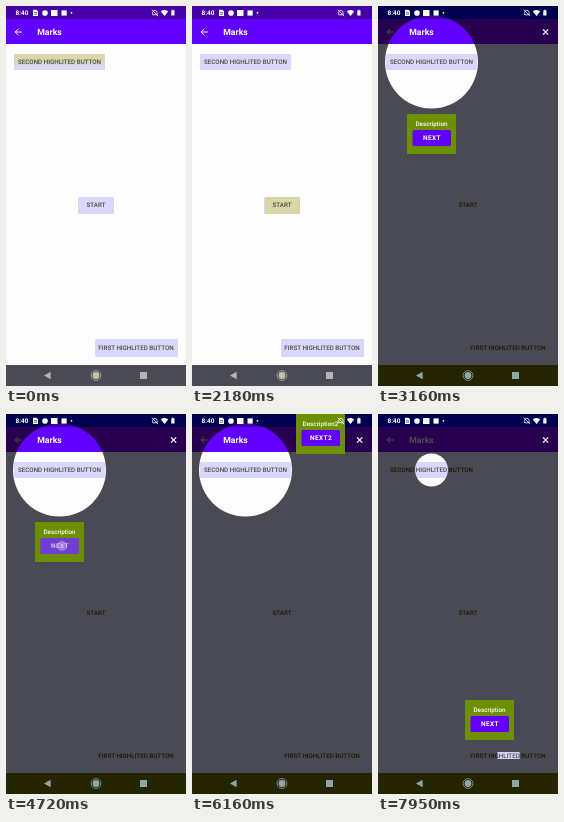
An HTML page for the animation above (8000 ms loop, 180 px wide and 380 px high).

```html
<!DOCTYPE html>
<html lang="en">
<head>
<meta charset="utf-8">
<title>Marks</title>
<style>
html, body { margin: 0; width: 100%; height: 100%; overflow: hidden; background: #fdfdfd; }
svg { display: block; width: 100%; height: 100%; font: 500 6.25px Roboto, sans-serif; text-rendering: geometricPrecision; }
text { text-anchor: middle; }
.lit { --page: #fdfdfd; --bar: #6200ff; --status: #4600a8; --nav: #4a4a54; --icon: #b4b4b4; --home: #c4c4a4; --button: #d8d8fc; --label: #4c4a38; --title: #fff; }
.dim { --page: #4a4a54; --bar: #280050; --status: #000050; --nav: #242400; --icon: #90a4ac; --home: #90a4ac; --button: #4a4a54; --label: #1c1800; --title: #4c4c4c; }
.label { fill: var(--label); }
.title { font-size: 8.7px; font-weight: 700; text-anchor: start; fill: var(--title); }
.plain { font-size: 6.3px; fill: #fff; }
.next { font-size: 6.5px; font-weight: 700; letter-spacing: .4px; fill: #fff; }
.clock { font-size: 6.4px; font-weight: 700; }

.anim { animation: 8s linear infinite both; }
.scale { transform-box: fill-box; transform-origin: center; }
.warm { animation-name: warm; }
.ripple { animation-name: ripple; }
.overlay { animation-name: overlay; }
.spot { animation-name: spot; }
.slot { animation-name: slot; }
.tip-a { animation-name: tip-a; }
.tip-b { animation-name: tip-b; }
.tip-c { animation-name: tip-c; }
.tap-a { animation-name: tap-a; }
.tap-b { animation-name: tap-b; }

@keyframes warm { 0%, 15.25% { opacity: 1; } 15.6%, 100% { opacity: 0; } }
@keyframes ripple {
  0%, 15.25% { transform: scale(0); opacity: 0; }
  15.5% { transform: scale(.1); opacity: 1; }
  20%, 28% { transform: scale(1); opacity: 1; }
  32%, 100% { transform: scale(1); opacity: 0; }
}
@keyframes overlay { 0%, 27.4% { opacity: 0; } 31.2%, 100% { opacity: 1; } }
@keyframes spot {
  0% { transform: scale(0); }
  27.4% { transform: scale(0); animation-timing-function: cubic-bezier(.37, 0, .63, 1); }
  39.5% { transform: scale(1); }
  95% { transform: scale(1); animation-timing-function: cubic-bezier(.33, 0, .67, .33); }
  97.5% { transform: scale(.75); }
  100% { transform: scale(.225); }
}
@keyframes slot {
  0% { transform: scale(0); }
  95% { transform: scale(0); animation-timing-function: cubic-bezier(.33, 0, .67, .33); }
  100% { transform: scale(.345); }
}
@keyframes tip-a { 0%, 27.4% { opacity: 0; } 31.2%, 59% { opacity: 1; } 64.25%, 100% { opacity: 0; } }
@keyframes tip-b {
  0% { opacity: 0; }
  67.75% { opacity: 0; animation-timing-function: ease-out; }
  77%, 93% { opacity: 1; }
  95.5%, 100% { opacity: 0; }
}
@keyframes tip-c { 0%, 95% { opacity: 0; } 98.5%, 100% { opacity: 1; } }
@keyframes tap-a { 0%, 52% { opacity: 0; } 55%, 64% { opacity: 1; } 65%, 100% { opacity: 0; } }
@keyframes tap-b { 0%, 90.1% { opacity: 0; } 92%, 95% { opacity: 1; } 96%, 100% { opacity: 0; } }
</style>
</head>
<body>
<svg viewBox="0 0 180 380" preserveAspectRatio="none">
  <defs>
    <g id="screen">
      <rect width="180" height="380" fill="var(--page)"/>
      <rect y="13" width="180" height="25" fill="var(--bar)"/>
      <rect width="180" height="13" fill="var(--status)"/>
      <rect y="359" width="180" height="21" fill="var(--nav)"/>
      <path d="M15.7 26H9.2M12.3 22.8L9.1 26l3.2 3.2" fill="none" stroke="var(--title)"/>
      <g fill="var(--button)">
        <rect x="8" y="48" width="91" height="16" rx="1"/>
        <rect x="72" y="191" width="36" height="17" rx="1"/>
        <rect x="89" y="333" width="83" height="18" rx="1"/>
      </g>
      <g fill="var(--icon)">
        <path d="M38 369.5l6.6-3.7v7.4z"/>
        <circle cx="90" cy="369.5" r="4.9" fill="none" stroke="var(--icon)" stroke-width=".8"/>
        <circle cx="90" cy="369.5" r="3.4" fill="var(--home)"/>
        <rect x="134" y="366" width="7" height="7"/>
      </g>
    </g>
    <g id="labels">
      <text class="title" x="31.2" y="29.2">Marks</text>
      <text class="label" x="53.5" y="58.4">SECOND HIGHLITED BUTTON</text>
      <text class="label" x="90" y="201.4">START</text>
      <text class="label" x="130" y="344.2">FIRST HIGHLITED BUTTON</text>
    </g>
    <g id="tip">
      <rect width="49" height="40" fill="#6c9000"/>
      <rect x="5.5" y="16" width="38.5" height="16" rx="1.5" fill="#6200ff"/>
    </g>
    <g id="tap">
      <rect x="5.5" y="16" width="38.5" height="16" rx="1.5" fill="#8888a0" opacity=".45"/>
      <circle cx="27" cy="24" r="5" fill="#c8b8f0" opacity=".5"/>
    </g>
    <linearGradient id="fade" x2="0" y2="1">
      <stop offset=".4" stop-color="#d9d6b0"/>
      <stop offset=".8" stop-color="#d8d8fc"/>
    </linearGradient>
    <clipPath id="start"><rect x="73" y="191" width="35" height="17" rx="1"/></clipPath>
    <mask id="holes" maskUnits="userSpaceOnUse" x="0" y="0" width="180" height="380">
      <rect width="180" height="380" fill="#fff"/>
      <circle class="anim scale spot" cx="53.5" cy="56" r="46.5"/>
      <rect class="anim scale slot" x="88.5" y="328.5" width="84" height="26"/>
    </mask>
  </defs>

  <g class="lit">
    <use href="#screen"/>
    <rect class="anim warm" x="8" y="48" width="91" height="16" rx="1" fill="url(#fade)"/>
    <g clip-path="url(#start)"><circle class="anim scale ripple" cx="90" cy="199" r="21" fill="#d9d6a8"/></g>
    <use href="#labels"/>
  </g>

  <g class="anim overlay">
    <g class="dim" mask="url(#holes)">
      <use href="#screen"/>
      <use href="#labels"/>
    </g>
    <path d="M165 23.4l5.2 5.2m0-5.2l-5.2 5.2" stroke="#fff" stroke-width="1.2"/>
  </g>

  <g class="anim tip-a"><g transform="translate(29 108)">
    <use href="#tip"/>
    <text class="plain" x="24.5" y="11.7">Description</text>
    <text class="next" x="25" y="26.4">NEXT</text>
    <use href="#tap" class="anim tap-a"/>
  </g></g>
  <g class="anim tip-b"><g transform="translate(104 0)">
    <use href="#tip"/>
    <text class="plain" x="24.5" y="11.7">Description2</text>
    <text class="next" x="25" y="26.4">NEXT2</text>
    <use href="#tap" class="anim tap-b"/>
  </g></g>
  <g class="anim tip-c"><g transform="translate(87 286)">
    <use href="#tip"/>
    <text class="plain" x="24.5" y="11.7">Description</text>
    <text class="next" x="25" y="26.4">NEXT</text>
  </g></g>

  <g fill="#fff">
    <text class="clock" x="16" y="9.2">8:40</text>
    <path d="M27 3.7h3.4l1.6 1.6v4.8h-5z"/>
    <path d="M28 6.6h3m-3 1.6h3" stroke="#28007c" stroke-width=".6"/>
    <circle cx="39" cy="7" r="2.8"/>
    <rect x="45" y="4" width="6.5" height="6"/>
    <rect x="55.5" y="4.4" width="5.2" height="5.2"/>
    <circle cx="65.5" cy="6.8" r=".9"/>
    <path d="M146.7 8.8V6.6a2.2 2.2 0 0 1 4.4 0v2.2z" fill="none" stroke="#fff" stroke-width=".8"/>
    <path d="M145.8 3.6l6.4 6.6" stroke="#fff" stroke-width=".8"/>
    <path d="M154.8 5.4q3.7-2.8 7.4 0L158.5 10z"/>
    <path d="M165.3 4.6h.9v-.8h1.4v.8h.9v5h-3.2z"/>
  </g>
</svg>
</body>
</html>
```
